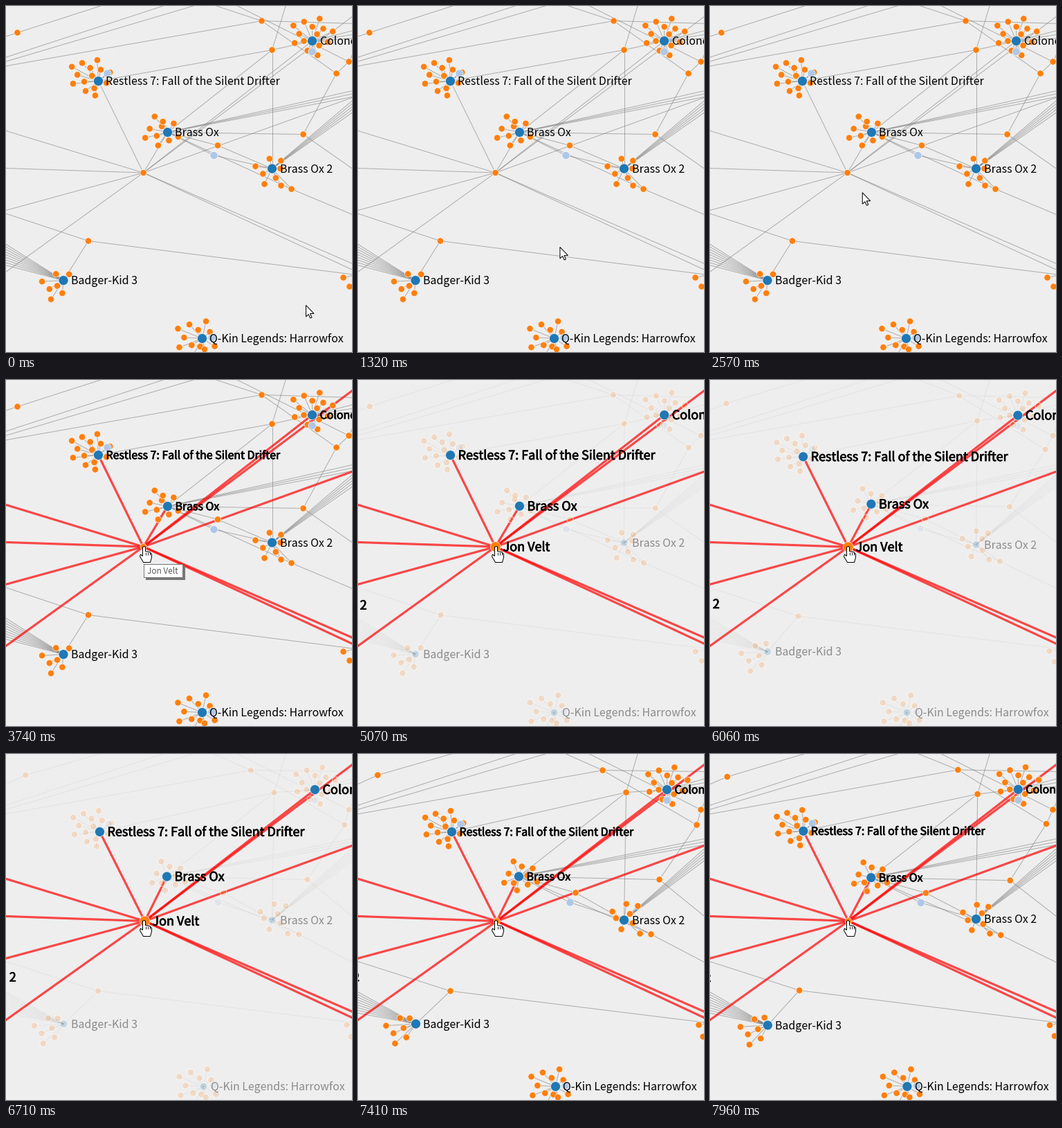
A matplotlib script for the animation above (8000 ms loop, 500 by 500 pixels).

```python
import numpy as np
import matplotlib.pyplot as plt
from matplotlib.animation import FuncAnimation
from matplotlib.collections import LineCollection
from matplotlib.colors import to_rgb
from matplotlib.patches import Polygon, Rectangle
from matplotlib.patheffects import withStroke

SIZE, DPI = 500, 100
LOOP, STEP = 8000, 20
PT = 72 / DPI
ORANGE, BLUE, PALE = "#ff7f0e", "#1f77b4", "#aec7e8"
FONT = "Noto Sans CJK JP"
GOLDEN = np.pi * (3 - np.sqrt(5))

# Motion is sampled at a steady beat; the states switch at these times (ms)
BEAT, FIRST = 138.15, 500
HOVER, TIP, TIP_FULL, FOCUS, RELEASE = 2850, 3620, 3740, 5070, 7140

# How far the graph has relaxed from its start to its end layout
RELAX = np.array([(4930, 0), (5490, 0.2), (6600, 1), (7410, 1), (7960, 0.7)])
POINTER = np.array([(500, 433, 432), (770, 408, 427), (1040, 335, 391),
                    (1590, 252, 309), (1740, 247, 304), (2010, 247, 304),
                    (2570, 211, 258), (3250, 199, 240)])

ends, kinds, labels, sats, links = {}, {}, {}, [], []


def node(name, start, end, color=ORANGE, radius=4.7):
    ends[name] = np.array(start, float), np.array(end, float)
    kinds[name] = to_rgb(color), radius


def cluster(name, label, start, end, count=0, spread=0, centre=(0, 0),
            drift=(0, 0), pale=None):
    """A labelled hub with satellites packed in a disc that slides past it."""
    for k in range(count):
        r, a = spread * np.sqrt((k + 0.5) / count), k * GOLDEN
        off = np.add(centre, (r * np.cos(a), r * np.sin(a)))
        satellite(name, off, drift, ORANGE, 4.7)
    if pale:
        satellite(name, np.array(pale), (0, 0), PALE, 5.6)
    node(name, start, end, BLUE, 7)
    labels[name] = label


def satellite(hub, off, drift, color, radius):
    key = f"{hub}/{len(sats)}"
    kinds[key] = to_rgb(color), radius
    sats.append((key, hub, off, np.array(drift)))
    links.append((hub, key))


def fan(hub, x, ys):
    links.extend((hub, (x, y)) for y in ys)


cluster("drifter", "Restless 7: Fall of the Silent Drifter", (133, 108),
        (135, 112), 14, 31, (-13, -6), pale=(13, -11))
cluster("ox", "Brass Ox", (233, 182), (232, 176.5), 10, 27, (-8, -2), (11, 1))
cluster("ox2", "Brass Ox 2", (384, 234.5), (384, 239.5), 7, 24, (-5, 0), (7, -9))
cluster("colonel", "Colonel Tundra", (442, 50), (446, 51), 14, 32, (-1, -7),
        pale=(0, 15.5))
cluster("badger", "Badger-Kid 3", (82.5, 396), (83, 389.5), 7, 24, (-12, 5),
        (-12, 1))
cluster("kin", "Q-Kin Legends: Harrowfox", (283, 480), (285, 480), 13, 33,
        (-7, 2), pale=(14, -1))
cluster("badger2", "Badger-Kid 2", (-107, 325), (-105, 322))

node("star", (198, 240.5), (200, 241))
node("nw", (16, 38), (28, 30))
node("top", (369, 21), (353, 23))
node("mid", (384, 63), (387, 55))
node("east", (477, 97), (489, 102))
node("edge", (495, 80), (495, 80))
node("arm", (429, 185), (435, 181))
node("bridge", (305.5, 201), (314, 200))
node("glow", (300, 215.5), (306, 214), PALE, 5.6)
node("foot", (412, 264), (423, 260))
node("toe", (397, 259), (407, 259))
node("low", (118.5, 339), (133, 342))
node("se", (487, 392), (492, 391))
node("se2", (496, 405), (498, 408))

links += [tuple(pair.split("-")) for pair in (
    "top-east mid-drifter mid-colonel mid-ox2 mid-ox east-edge arm-ox arm-east "
    "ox-bridge bridge-ox2 ox-glow glow-ox2 ox-foot foot-ox2 toe-ox2 "
    "low-badger").split()]
links += [("nw", (-5, 45)), ("nw", (150, -5)), ((-5, 75), (240, -5)),
          ((-5, 81), (285, -5)), ((-5, 87), "top"), ("top", (290, -5)),
          ("top", (505, 25)), ((325, -5), "edge"), ("mid", (405, -5)),
          ("edge", (505, 60)), ("arm", (505, 238)), ("foot", (505, 303)),
          ("low", (-5, 298)), ("low", (505, 388)), ("se", (505, 388))]
fan("ox", 505, np.linspace(121, 130, 3))
fan("ox2", 505, np.linspace(132, 150, 5))
fan("colonel", 505, np.linspace(34, 46, 3))
fan("badger", -5, np.linspace(341, 373, 9))
hot = [("star", end) for end in (
    "drifter", "ox", "colonel", (505, 11), (505, 130), (505, 374), (505, 383),
    (-5, 178.5), (-5, 233.8), (-5, 296), (-5, 387))]

LIT = {"drifter", "ox", "colonel", "badger2", "star"}
names = list(kinds)
rgb = np.array([kinds[n][0] for n in names])
base_r = np.array([kinds[n][1] for n in names])
lit = np.array([n in LIT for n in names])
is_hub = np.array([n in labels for n in names])
star = names.index("star")

fig = plt.figure(figsize=(SIZE / DPI, SIZE / DPI), dpi=DPI, facecolor="#eeeeee")
ax = fig.add_axes([0, 0, 1, 1])
# Whole coordinates fall on pixel centres
ax.set(xlim=(-0.5, SIZE - 0.5), ylim=(SIZE - 0.5, -0.5))
ax.axis("off")


def lines(z, color, width):
    made = LineCollection([], zorder=z, color=color, linewidth=width * PT)
    return ax.add_collection(made, autolim=False)


gray = lines(1, "#777777", 1)
red = lines(2, (1, 0, 0, 0.7), 3.2)
dots = ax.scatter(*np.zeros((2, len(names))), zorder=3)
texts = {k: ax.text(0, 0, s, family=FONT, zorder=4)
         for k, s in {**labels, "star": "Jon Velt"}.items()}

tip = [ax.add_patch(Rectangle((201, 268), 57, 20, fc="#777777", lw=0, zorder=5)),
       ax.add_patch(Rectangle((198, 265), 56, 19, fc="white", ec="#767676",
                              lw=PT, zorder=6)),
       ax.text(204, 279, "Jon Velt", family=FONT, fontsize=11.8 * PT,
               color="#575757", zorder=7)]

ARROW = np.array([(0, 0), (0, 16.5), (3.7, 13), (6.2, 18.5), (8.5, 17.5),
                  (6, 12), (11.5, 12)])
HAND = np.array([(-2, 1), (0, 0), (2, 1), (2, 7), (8, 8), (11, 11), (11, 16),
                 (9, 23), (-1, 23), (-6, 14.5), (-5, 11.5), (-2, 14)])
KNUCKLES = np.array([[(x, 8), (x, 12.5)] for x in (2, 5.3, 8.3)])
cursor = ax.add_patch(Polygon(ARROW, fc="white", ec="black", lw=PT, zorder=8))
knuckles = lines(9, "black", 0.9)


def layout(t):
    w = np.interp(t, *RELAX.T)
    pos = {k: a + (b - a) * w for k, (a, b) in ends.items()}
    for key, hub, off, drift in sats:
        arm = off + drift * w
        gap = np.hypot(*arm)
        pos[key] = pos[hub] + arm * max(1, 12 / gap)
    return pos


def segments(pairs, pos):
    return [[pos[e] if isinstance(e, str) else e for e in pair] for pair in pairs]


def draw_dots(pos, focus):
    alpha = np.where(lit | (not focus), 1.0, 0.18)
    r = np.where(is_hub & ~lit & focus, 5.4, base_r)
    if focus:
        r[star] = 7.4
    dots.set_offsets([pos[n] for n in names])
    dots.set_sizes((2 * r * PT) ** 2)
    dots.set_facecolors(np.column_stack([rgb, alpha]))
    dots.set_edgecolors((1, 1, 1, 0.7))
    dots.set_linewidths(0.9 * PT)


def draw_labels(pos, hover, focus):
    bold = [withStroke(linewidth=0.75 * PT, foreground="black")]
    for k, text in texts.items():
        strong = hover and k in LIT
        big = focus and strong
        text.set_visible(k != "star" or focus)
        text.set_position(pos[k] + (11, 6.2 if big else 5.6))
        text.set_fontsize((18 if big else 15.9) * PT)
        text.set_color("#8c8c8c" if focus and not strong else "black")
        text.set_path_effects(bold if strong else [])


def draw(i):
    now = i * STEP + STEP // 2
    t = FIRST + BEAT * max(0, (now - FIRST) // BEAT)
    hover, focus = now >= HOVER, FOCUS <= now < RELEASE
    pos = layout(t)

    gray.set_segments(segments(links if hover else links + hot, pos))
    gray.set_alpha(0.09 if focus else 0.55)
    red.set_segments(segments(hot, pos) if hover else [])
    draw_dots(pos, focus)
    draw_labels(pos, hover, focus)

    for part in tip:
        part.set_visible(TIP <= now < FOCUS)
        part.set_alpha(0.5 if now < TIP_FULL else 1)

    at = [np.interp(t, POINTER[:, 0], POINTER[:, c]) for c in (1, 2)]
    cursor.set_xy((HAND if hover else ARROW) + at)
    knuckles.set_segments(KNUCKLES + at if hover else [])
    return []


anim = FuncAnimation(fig, draw, frames=LOOP // STEP, interval=STEP,
                     init_func=lambda: draw(0), repeat=True, repeat_delay=0)
plt.show()
```
